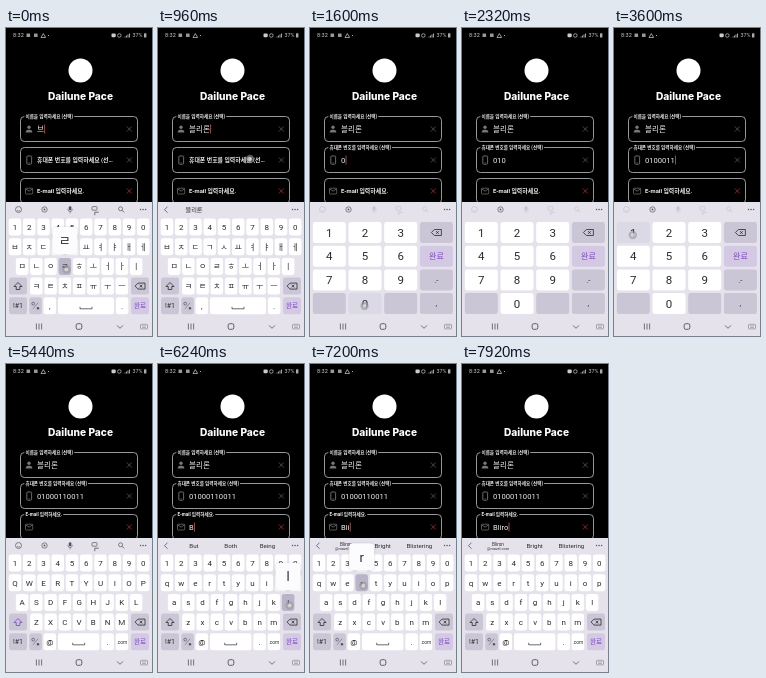
An HTML page with a canvas for the animation above (8000 ms loop, 146x308 px).

```html
<!DOCTYPE html>
<html lang="ko">
<head>
<meta charset="utf-8">
<title>Sign-up form</title>
<style>
html, body { margin: 0; width: 100%; height: 100%; overflow: hidden; background: #000; }
canvas { display: block; width: 146px; height: 308px; }
</style>
</head>
<body>
<canvas id="stage"></canvas>
<script>
const LOOP = 8000, W = 146, H = 308;
const FONT = 'Roboto, "Noto Sans CJK KR", "Noto Sans KR", sans-serif';
const INK = '#2b2a30', DARK = '#55535c', PURPLE = '#7f45c4';
const BOARD = '#e5e2eb', GREY_KEY = '#cbc6d5', LILAC = '#d3c9e3', PRESSED = '#b9b4c8';
const PHONE_FOCUS = 1040, MAIL_FOCUS = 4790;

const canvas = document.getElementById('stage');
const ctx = canvas.getContext('2d');
const scale = window.devicePixelRatio || 1;
canvas.width = W * scale;
canvas.height = H * scale;

// Each keystroke: time, key, resulting text
const nameKeys = [[-200, 'ㅡ', '브'], [80, 'ㄹ', '블'], [200, 'ㄹ', '블ㄹ'], [320, 'ㅣ', '블리'],
  [440, 'ㄹ', '블릴'], [550, 'ㅗ', '블리로'], [640, 'ㄴ', '블리론']];
const spell = (word, times) => times.map((t, i) => [t, word[i], word.slice(0, i + 1)]);
const phoneKeys = spell('01000110011',
  [1560, 1700, 1820, 2540, 2880, 3220, 3560, 3760, 3960, 4180, 4400]);
const mailKeys = spell('Bliro', [5900, 6400, 6900, 7320, 7600]);

const typed = (keys, t) => keys.filter(k => k[0] <= t).pop();
const pressed = (keys, t, before, after) =>
  (keys.find(k => t >= k[0] - before && t < k[0] + after) || [])[1];

function text(str, x, y, size, color, weight = 400, align = 'center', family = FONT) {
  ctx.font = `${weight} ${size}px ${family}`;
  ctx.fillStyle = color;
  ctx.textAlign = align;
  ctx.textBaseline = 'alphabetic';
  ctx.fillText(str, x, y + size * 0.36);
}

function box(x, y, w, h, r, fill, stroke, line = 0.7) {
  ctx.beginPath();
  ctx.roundRect(x, y, w, h, r);
  if (fill) { ctx.fillStyle = fill; ctx.fill(); }
  if (stroke) { ctx.strokeStyle = stroke; ctx.lineWidth = line; ctx.stroke(); }
}

function disc(x, y, r, fill, stroke) {
  box(x - r, y - r, 2 * r, 2 * r, r, fill, stroke);
}

function path(d, x, y, color, line = 0.8) {
  ctx.save();
  ctx.translate(x, y);
  ctx.strokeStyle = color;
  ctx.lineWidth = line;
  ctx.stroke(new Path2D(d));
  ctx.restore();
}

function touch(x, y) {
  disc(x, y, 4.2, 'rgba(150,150,155,.6)');
  disc(x, y, 2, 'rgba(225,225,230,.75)');
}

function statusBar() {
  text('8:32', 7, 7.3, 5.6, '#ccc', 400, 'left');
  [20.5, 28].forEach(x => box(x, 5.5, 3.6, 3.6, 0.6, '#999'));
  path('M0 4L2.3 0L4.6 4Z', 35, 5.5, '#bbb');
  disc(42.5, 7.5, 0.6, '#ccc');
  box(105.5, 5.5, 4.2, 3.8, 1, '#ccc');
  disc(113.3, 7.5, 1.8, null, '#ccc');
  path('M0 4V3M1.5 4V2M3 4V1M4.5 4V0', 119, 5.5, '#ccc');
  text('37%', 136.5, 7.3, 5.4, '#ccc', 400, 'right');
  box(138, 5.2, 2.4, 4.4, 0.5, '#aaa');
}

const icons = {
  person(y) {
    disc(23, y - 1.8, 1.7, '#777');
    box(19.7, y + 0.7, 6.6, 2.8, [2.5, 2.5, 0, 0], '#777');
  },
  phone(y) {
    box(20.8, y - 4, 4.8, 8.2, 0.9, null, '#777', 0.9);
    path('M0 0H1.4', 22.5, y + 2.8, '#777', 0.6);
  },
  mail(y) {
    box(19.5, y - 2.8, 7.2, 5.8, 0.7, null, '#777');
    path('M0 0L3.6 2.5L7.2 0', 19.5, y - 2.3, '#777');
  }
};

function field(top, icon, label, rest, float, keys, t, focused, crossColor) {
  const mid = top + 12.5;
  box(14.5, top, 117, 25, 4, '#000', '#bdbdbd', 0.8);
  icons[icon](mid);
  path('M0 0L5 5M5 0L0 5', 120.8, mid - 2.5, crossColor);

  const size = 5.9 - 1.3 * float;
  if (float > 0) {
    ctx.font = `700 4.6px ${FONT}`;
    const gap = (ctx.measureText(label).width + 2) * float;
    ctx.fillStyle = '#000';
    ctx.fillRect(18.4, top - 1, gap, 2);
  }
  text(float ? label : rest, 31 - 11.6 * float, mid - 0.6 - 12 * float, size, '#f2f2f2', 700, 'left');

  const last = typed(keys, t), value = last ? last[2] : '';
  text(value, 31, mid, 7.6, '#eee', 400, 'left');
  if (!focused) return;
  const since = last ? last[0] : icon === 'mail' ? MAIL_FOCUS : PHONE_FOCUS;
  if ((t - since) % 1000 < 500) {
    ctx.fillStyle = '#d4706c';
    ctx.fillRect(31.4 + ctx.measureText(value).width, mid - 4.5, 0.7, 9);
  }
}

function toolbar(words, pale) {
  const soft = pale ? '#c6c3ce' : DARK;
  [0, 1, 2].forEach(i => disc(134.6 + i * 2.5, 181.5, 0.7, DARK));
  if (words) {
    path('M3 0L0 3L3 6', 6.5, 178.7, DARK);
    words.forEach((word, i) => {
      const x = 36 + i * 36.7, [main, sub] = word.split('\n');
      text(main, x, sub ? 180 : 181.8, sub ? 4.6 : 6.2, INK);
      if (sub) text(sub, x, 184.8, 3.8, INK);
    });
    return;
  }
  disc(12.5, 181.5, 3, null, soft);
  path('M0 0Q1.5 1.6 3 0', 11, 182.3, soft, 0.6);
  disc(38.5, 181.5, 2.7, null, DARK);
  disc(38.5, 181.5, 0.9, DARK);
  box(62.8, 178.2, 2.6, 4.2, 1.3, soft);
  path('M0 0Q0 2.8 2.3 2.8T4.6 0M2.3 2.8V4.6', 61.8, 180.8, soft, 0.6);
  box(86, 178.6, 5, 3.6, 0.8, null, soft);
  path('M0 3V0H4', 88.8, 184.2, soft);
  disc(114.6, 180.8, 2, null, soft);
  path('M0 0L2.2 2.2', 116, 182.2, soft);
}

function backspace(x, y) {
  path('M0 3L3 0H10V6H3Z M4.7 1.7L7.4 4.3M7.4 1.7L4.7 4.3', x - 5, y - 3, INK);
}

function key(x, y, w, h, label, fill = '#fff', size = 8, color = INK) {
  box(x - w / 2, y - h / 2, w, h, 2.4, fill);
  if (label === '⌫') backspace(x, y);
  else text(label, x, y, size, color);
}

function letterBoard(rows, down, mail, caps) {
  const rowY = i => 199 + 19.7 * i, kh = 17, pitch = 14.25;
  let hit;
  rows.forEach((row, r) => [...row].forEach((ch, i) => {
    const slots = r === 3 ? 7 : row.length;
    const x = 73.1 + (i - (slots - 1) / 2) * pitch, y = rowY(r);
    const isDown = down && ch === down.toLowerCase();
    const label = caps ? ch.toUpperCase() : ch;
    key(x, y, 12.5, kh, label, isDown ? PRESSED : '#fff');
    if (isDown) hit = [x, y, label];
  }));

  const y4 = rowY(3), y5 = rowY(4);
  key(12, y4, 18, kh, '', GREY_KEY);
  path('M4 0L8 4H5.8V7H2.2V4H0Z', 8, y4 - 3.6, caps ? PURPLE : INK);
  key(134, y4, 18, kh, '⌫', GREY_KEY);
  key(12, y5, 18, kh, '!#1', GREY_KEY, 7);
  key(29.6, y5, 12.5, kh, '', GREY_KEY);
  path('M0 6L5 0', 27.1, y5 - 3, DARK, 0.5);
  disc(27.2, y5 - 2.2, 1.4, null, DARK);
  disc(32, y5 + 2.4, 1.2, DARK);
  key(43.8, y5, 12.5, kh, mail ? '@' : ',');
  const end = mail ? 93.4 : 108;
  key((52 + end) / 2, y5, end - 52, kh, '');
  path('M0 0V2H12V0', (52 + end) / 2 - 6, y5 + 1, INK, 0.7);
  if (mail) {
    key(101.6, y5, 12.5, kh, '.');
    key(115.9, y5, 12.5, kh, '.com', '#fff', 4.8);
  } else {
    key(116.1, y5, 12.5, kh, '.');
  }
  key(134, y5, 18, kh, '완료', LILAC, 6.6, PURPLE);

  if (hit) {
    const [x, y, label] = hit;
    const px = Math.max(14, Math.min(130, x));
    touch(x + 1.5, y + 3);
    ctx.save();
    ctx.shadowColor = 'rgba(0,0,0,.2)';
    ctx.shadowBlur = 2 * scale;
    box(px - 12.5, y - 39.5, 25, 27, 4, '#fcfcfe');
    ctx.restore();
    text(label, px, y - 25.8, 13, INK);
  }
}

function numberBoard(down) {
  const rows = [['1', '2', '3', '⌫'], ['4', '5', '6', '완료'], ['7', '8', '9', '.-'], ['', '0', '', ',']];
  rows.forEach((row, r) => row.forEach((label, c) => {
    const x = 19.3 + 35.7 * c, y = 204.5 + 23.7 * r;
    const digit = /\d/.test(label), done = label === '완료';
    const fill = digit ? (label === down ? '#dcd9e6' : '#fff') : done ? LILAC : GREY_KEY;
    key(x, y, 33, 21, label, fill, digit ? 11.5 : 8, done ? PURPLE : INK);
    if (digit && label === down) touch(x - 0.5, y + 2.5);
  }));
}

function navBar() {
  path('M0 0V6M2.6 0V6M5.2 0V6', 30.4, 295.5, DARK);
  box(70.2, 295.7, 5.6, 5.6, 1.5, null, DARK, 0.9);
  path('M0 0L3 3L6 0', 111, 297.3, DARK);
  box(134.5, 296.3, 7, 4.6, 0.8, null, '#77757e', 0.6);
  path('M0 0H4M0 1.5H4', 136, 297.9, '#77757e', 0.5);
}

const digits = '1234567890';
const hangul = [digits, 'ㅂㅈㄷㄱㅅㅛㅕㅑㅐㅔ', 'ㅁㄴㅇㄹㅎㅗㅓㅏㅣ', 'ㅋㅌㅊㅍㅠㅜㅡ'];
const latin = [digits, 'qwertyuiop', 'asdfghjkl', 'zxcvbnm'];

function keyboard(t) {
  ctx.fillStyle = BOARD;
  ctx.fillRect(0, 174, W, H - 174);
  if (t < PHONE_FOCUS) {
    toolbar(t < 160 ? null : [typed(nameKeys, t)[2]]);
    letterBoard(hangul, pressed(nameKeys, t, 80, 0));
  } else if (t < MAIL_FOCUS) {
    toolbar(null, true);
    numberBoard(pressed(phoneKeys, t, 70, 90));
  } else {
    const n = mailKeys.filter(k => k[0] <= t).length;
    toolbar(n === 0 ? null : n < 3 ? ['But', 'Both', 'Being']
      : ['Bliron\n@mavel.com', 'Bright', 'Blistering']);
    letterBoard(latin, pressed(mailKeys, t, 160, 0), true, n === 0);
  }
  navBar();
}

function rise(t, start) {
  const p = Math.max(0, Math.min(1, (t - start) / 300));
  return p * p * (3 - 2 * p);
}

function draw(t) {
  ctx.setTransform(scale, 0, 0, scale, 0, 0);
  ctx.fillStyle = '#000';
  ctx.fillRect(0, 0, W, H);
  statusBar();
  disc(74.5, 42.5, 12, '#fff');
  text('Dailune Pace', 74.5, 68, 10.2, '#fff', 800, 'center', 'Inter, sans-serif');

  const onPhone = t >= PHONE_FOCUS && t < MAIL_FOCUS;
  field(88.5, 'person', '이름을 입력하세요 (선택)', '', 1, nameKeys, t, t < PHONE_FOCUS, '#5c5c5c');
  field(119.5, 'phone', '휴대폰 번호를 입력하세요 (선택)', '휴대폰 번호를 입력하세요 (선…',
    rise(t, PHONE_FOCUS), phoneKeys, t, onPhone, '#5c5c5c');
  field(150.5, 'mail', 'E-mail 입력하세요.', 'E-mail 입력하세요.',
    rise(t, MAIL_FOCUS), mailKeys, t, t >= MAIL_FOCUS, '#b32d2d');
  if (t >= 880 && t < PHONE_FOCUS) touch(92, 131);
  if (t >= 4560 && t < MAIL_FOCUS) touch(94, 166);
  keyboard(t);
}

const begin = performance.now();
function tick() {
  draw((performance.now() - begin) % LOOP);
  requestAnimationFrame(tick);
}
tick();
</script>
</body>
</html>
```
